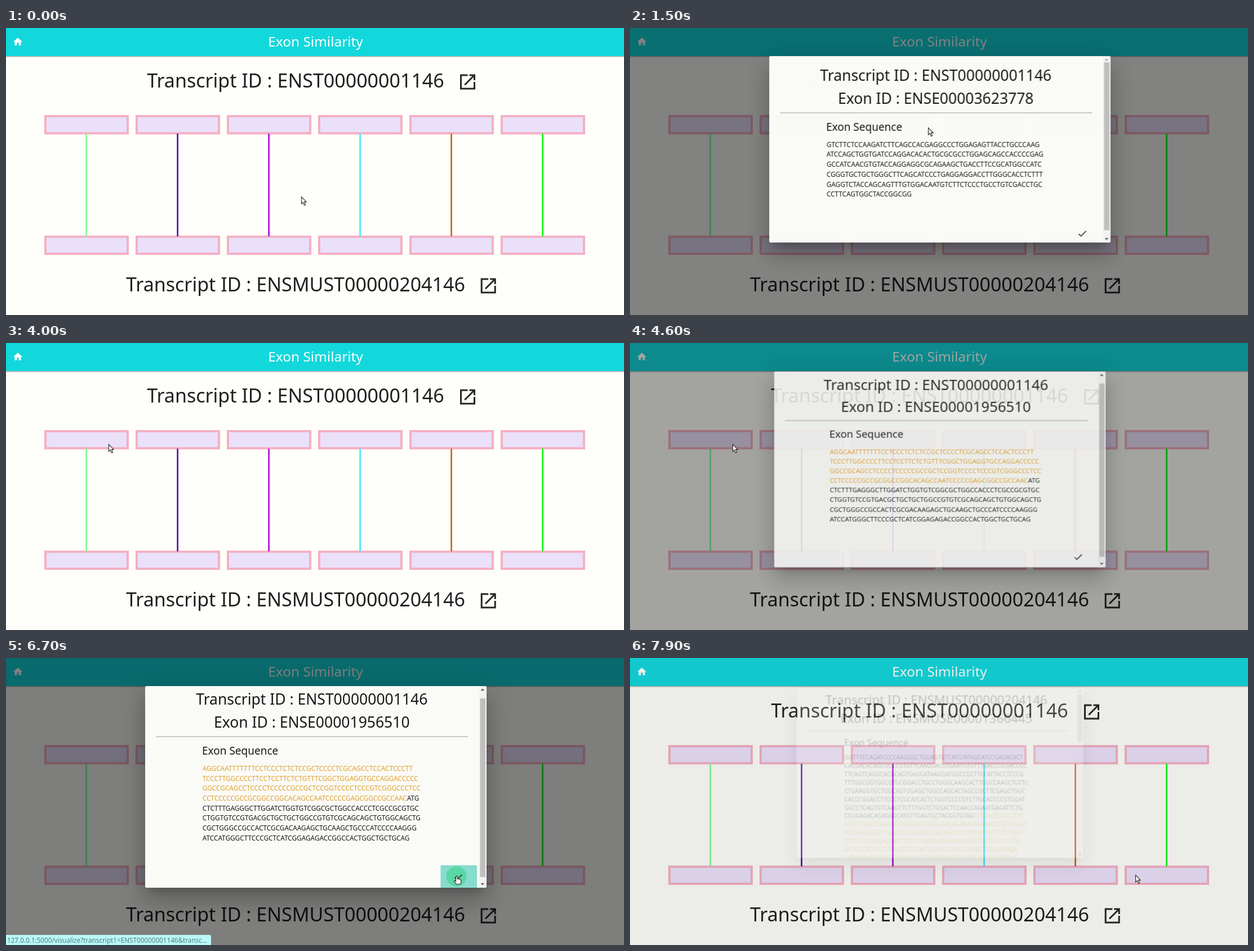
An HTML page for the animation above (8 s loop, 1097 by 511 pixels).

```html
<!DOCTYPE html>
<html lang="en">
<head>
<meta charset="utf-8">
<title>Exon Similarity</title>
<style>
html, body { margin: 0; width: 100%; height: 100%; overflow: hidden; background: #fefefa; }
body { position: relative; font-family: "Noto Sans", "Open Sans", sans-serif; }
svg { position: absolute; left: 0; top: 0; overflow: visible; }
text { fill: #1f1f1f; white-space: pre; }
.mid { text-anchor: middle; }
#bar { position: absolute; left: 0; top: 0; width: 1097px; height: 50px; background: #12d8dc;
  box-shadow: 0 1px 2px rgba(0,0,0,.45); }
#shade { position: absolute; inset: 0; background: #000; opacity: 0; }
.modal { position: absolute; left: 246.5px; top: 50px; width: 605.5px; overflow: hidden; opacity: 0;
  background: #fafaf6; border-radius: 2px;
  box-shadow: 0 24px 38px 3px rgba(0,0,0,.14), 0 9px 46px 8px rgba(0,0,0,.12), 0 11px 15px -7px rgba(0,0,0,.2); }
.modal text { fill: #181818; }
.modal .utr { fill: #e2a02c; }
#status { position: absolute; left: 0; top: 493px; width: 364px; height: 18px; opacity: 0;
  background: #b8f8f8; border-radius: 0 3px 0 0; font-size: 11.7px; line-height: 19px;
  color: #587a7e; white-space: nowrap; text-indent: 2px; }
</style>
</head>
<body>
<div id="bar"></div>
<svg id="page" width="1097" height="511"></svg>
<div id="shade"></div>
<div id="status">127.0.0.1:5000/visualize?transcript1=ENST00000001146&amp;transc…</div>
<svg id="pointer" width="20" height="20" stroke="#222" stroke-width="1.1">
  <path d="M.5 .5V13L3.4 10.4 5.4 15.6 7.6 14.7 5.5 9.6H9.2Z" fill="#fff"/>
  <path d="M-1.5 8V1.2Q-.2 -1 1.1 1.2V5L5.4 6 7.8 7.5V10.5L6.6 14.8H-.6L-4.6 9.8Q-4 7.5 -1.5 9.6Z" fill="#fff"/>
  <path d="M-3 -8H3M0 -8V8M-3 8H3" fill="none"/>
</svg>
<script>
const LOOP = 8000, STEP = 100, FADE = 250, SCROLL = 11;
const $ = id => document.getElementById(id);

const OPEN_ICON = 'M12 4H4V20H20V12M14 4H20V10M20 4L8.5 15.5';
const HOME_ICON = 'M10 20v-6h4v6h5v-8h3L12 3 2 12h3v8z';
const CHECK_ICON = 'M4 12.7L9 17.6 20.3 6.3';

const icon = (d, x, y, k, paint) => `<path d="${d}" transform="translate(${x} ${y}) scale(${k})" ${paint}/>`;
const stroke = 'fill="none" stroke="#262626" stroke-width="2"';
const label = (s, x, y, size, extra = '') => `<text x="${x}" y="${y}" font-size="${size}" ${extra}>${s}</text>`;
const centred = (s, x, y, size, extra = '') => label(s, x, y, size, 'class="mid" ' + extra);

// Page behind the dialogs
const HUMAN = 'Transcript ID : ENST00000001146', MOUSE = 'Transcript ID : ENSMUST00000204146';
const exon = (x, y) => `<rect x="${x + 2}" y="${y + 2}" width="146" height="30.4" fill="#eae0fa" stroke="#f4b0c4" stroke-width="4"/>`;
const links = ['#7dfa90', '#5208ac', '#ac04d8', '#40e8f8', '#d05a20', '#0cf80c'];
$('page').innerHTML =
  icon(HOME_ICON, 11.4, 14.8, .8, 'fill="#fff"') +
  centred('Exon Similarity', 549.5, 32.5, 24.4, 'style="fill:#fff"') +
  centred(HUMAN, 514, 106, 34) + icon(OPEN_ICON, 801.5, 78, 1.5, stroke) +
  centred(MOUSE, 514, 469, 34) + icon(OPEN_ICON, 838.2, 441, 1.5, stroke) +
  links.map((c, i) => {
    const x = 68 + 162 * i;
    return exon(x, 155) + exon(x, 369.6) +
      `<path d="M${x + 74.6} 188V371" stroke="${c}" stroke-width="2.6"/>`;
  }).join('');

// Dialogs; lower-case runs are the untranslated parts
const dialogs = [
  { title: HUMAN, exon: 'ENSE00003623778', h: 332, thumb: 299, open: 1282, close: 3150,
    hover: 2400, press: 3000, spot: 557.5, tint: '#62d9ca', seq: `
GTCTTCTCCAAGATCTTCAGCCACGAGGCCCTGGAGAGTTACCTGCCCAAG
ATCCAGCTGGTGATCCAGGACACACTGCGCGCCTGGAGCAGCCACCCCGAG
GCCATCAACGTGTACCAGGAGGCGCAGAAGCTGACCTTCCGCATGGCCATC
CGGGTGCTGCTGGGCTTCAGCATCCCTGAGGAGGACCTTGGGCACCTCTTT
GAGGTCTACCAGCAGTTTGTGGACAATGTCTTCTCCCTGCCTGTCGACCTGC
CCTTCAGTGGCTACCGGCGG` },
  { title: HUMAN, exon: 'ENSE00001956510', h: 359, thumb: 318, open: 4482, close: 6750,
    hover: 6400, press: 6600, spot: 552.5, tint: '#86dccd', seq: `
aggcaatttttttcctccctctctccgctcccctcgcagcctccactccctt
tcccttggccccttcctccttctctgtttcggctggaggtgccaggaccccc
ggccgcagcctcccctcccccgccgctccggtcccctcccgtcgggccctcc
cctcccccgccgcggccggcacagccaatcccccgagcggccgccaacATG
CTCTTTGAGGGCTTGGATCTGGTGTCGGCGCTGGCCACCCTCGCCGCGTGC
CTGGTGTCCGTGACGCTGCTGCTGGCCGTGTCGCAGCAGCTGTGGCAGCTG
CGCTGGGCCGCCACTCGCGACAAGAGCTGCAAGCTGCCCATCCCCAAGGG
ATCCATGGGCTTCCCGCTCATCGGAGAGACCGGCCACTGGCTGCTGCAG` },
  { title: MOUSE, exon: 'ENSMUSE00001366445', h: 359, thumb: 100, open: 7882, close: 9999, seq: `
GGTTTCCAGATCCCCAAGGGCTGGAGTGTCATGTATAGCATCCGAGACACT
CACGACACAGCGGCCGTGTTCAAGGACGTGAATGTGTTTGACCCGGACCGC
TTCAGTCAGGCACGCAGTGAGGATAAGGATGGCCGCTTCCATTACCTCCCG
TTTGGCGGTGGCGTGCGGACCTGCCTGGGCAAGCACTTGGCCAAGCTGTTC
CTGAAGGTGCTGGCAGTGGAGCTGGCCAGCACTAGCCGCTTCGAGCTGGC
CACCCGGACCTTCCCTCGCATCACTCTGGTCCCCGTCTTGCACCCCGTGGAT
GGCCTCAGTGTCAAGTTCTTTGGTCTGGACTCCAACCAGAATGAGATTCTG
CCGGAGACAGAGGCCATGTTGAGTGCTACGGTGTAGcctcactctggtctc
agcccagcccaacagcaggggtgggggacagagatagaaacctgtggggt
ggggaggggctgggtgggaggccagcagccccctatgttgttctctggcc
tcttccctggcagtacctcccccaaagacaaaagggcccgccccctcctg
actccctctctcttggatctccactgccacctagcttagcctgggacaga
ggtaccactctacccatcacagtcttacccagccccttcacgaggtccag` }
];

// One keyframe per step, each held until the next
function play(el, fn) {
  const frames = [];
  for (let t = 0; t < LOOP; t += STEP) frames.push({ ...fn(t), offset: t / LOOP, easing: 'step-end' });
  frames.push({ ...fn(LOOP - STEP), offset: 1 });
  el.animate(frames, { duration: LOOP, iterations: Infinity });
}

const clamp = u => Math.max(0, Math.min(1, u));
const easeOut = (u, n) => 1 - (1 - clamp(u)) ** n;
const shown = (d, t, nIn, nOut) => t < d.close
  ? easeOut((t - d.open) / FADE, nIn)
  : 1 - easeOut((t - d.close) / FADE, nOut);
const scrolled = t => t < 2700 ? 0 : t < 2800 ? 6 : SCROLL;

const seqLine = (s, i) => label(
  s.replace(/[a-z]+/g, m => `<tspan class="utr">${m.toUpperCase()}</tspan>`), 101.7, 161.8 + 17.7 * i, 11.8);

function buttonMarkup(d, i) {
  const y = d.h - 37 + (i ? 8 : 0);
  const box = `x="524.5" y="${y}" width="64.5" height="43"`;
  return `<clipPath id="clip${i}"><rect ${box}/></clipPath>
    <rect class="btn" ${box} rx="2" fill="${d.tint}" opacity="0"/>
    <circle class="wave" cx="${d.spot}" cy="${y + 20}" r="20" fill="#4fd69a" opacity="0" clip-path="url(#clip${i})"/>` +
    icon(CHECK_ICON, 546.3, y + 11.6, .8, stroke);
}

function buildDialog(d, i) {
  const el = document.createElement('div');
  el.className = 'modal';
  el.style.height = d.h + 'px';
  el.innerHTML = `<svg width="605.5" height="${d.h}"><g class="body">` +
    centred(d.title, 295.8, 44.4, 26.5) +
    centred('Exon ID : ' + d.exon, 295.8, 84.6, 26.5) +
    '<path d="M19.5 101H573" stroke="#b8b8b6" stroke-width="1.6"/>' +
    label('Exon Sequence', 101, 132.6, 19) +
    d.seq.trim().split('\n').map(seqLine).join('') + (d.spot ? buttonMarkup(d, i) : '') + `</g>
    <rect x="593" width="12.5" height="${d.h}" fill="#f3f3f1"/>
    <rect class="thumb" x="594.5" y="11" width="9.5" height="${d.thumb}" fill="#bfbfbd"/>
    <path class="up" d="M595.8 8h6.4l-3.2-3.6z" fill="#505050"/>
    <path class="down" d="M595.8 ${d.h - 8}h6.4l-3.2 3.6z" fill="#505050"/></svg>`;
  document.body.insertBefore(el, $('status'));

  const part = c => el.querySelector('.' + c);
  play(el, t => {
    const p = shown(d, t, 3, 3);
    return { opacity: p, transform: `translateY(${(p - 1) * 30.7}px) scale(${.8 + .2 * p})` };
  });
  const offset = t => i ? SCROLL : scrolled(t);
  play(part('body'), t => ({ transform: `translateY(${-offset(t)}px)` }));
  play(part('thumb'), t => ({ transform: `translateY(${i > 1 ? 2.5 : offset(t)}px)` }));
  if (!i) {
    play(part('up'), t => ({ fill: scrolled(t) ? '#505050' : '#a6a6a6' }));
    play(part('down'), t => ({ fill: scrolled(t) < SCROLL ? '#505050' : '#a6a6a6' }));
  }
  if (d.spot) {
    play(part('btn'), t => ({ opacity: t < d.hover ? 0 : t < d.press ? .8 : 1 }));
    play(part('wave'), t => ({
      opacity: t < d.press ? 0 : .8,
      r: `${Math.max(0, 7 + (t - d.press) * .11)}px`
    }));
  }
}
dialogs.forEach(buildDialog);

play($('shade'), t => ({ opacity: .5 * Math.max(...dialogs.map(d => shown(d, t, 2, 4))) }));

const within = (t, a, b) => t < a || t > b ? 0 : t === a || t === b ? .5 : 1;
play($('status'), t => ({ opacity: Math.max(within(t, 2400, 3700), within(t, 6500, 7100)) }));

// Pointer glides: first and last step in time, then where it arrives
const glides = [
  [600, 700, 555, 225], [800, 900, 531, 177], [1100, 1100, 529, 177], [2000, 2000, 734, 305],
  [2200, 2500, 804, 348], [3300, 3500, 451, 262], [3700, 4000, 182, 180], [4800, 5100, 611, 256],
  [5200, 5300, 649, 256], [5400, 5500, 708, 256], [5700, 5700, 697, 256], [5800, 5800, 709, 256],
  [6000, 6000, 719, 261], [6200, 6500, 800, 388], [6900, 7000, 1016, 400], [7100, 7300, 897, 386]
];
function pointerAt(t) {
  let x = 524, y = 300;
  for (const [from, to, gx, gy] of glides) {
    const u = clamp((t - from + STEP) / (to - from + STEP));
    x += (gx - x) * u;
    y += (gy - y) * u;
  }
  return `translate(${x}px, ${y}px)`;
}
const between = (t, a, b) => t >= a && t < b;
const shapeAt = t => between(t, 2400, 3300) || between(t, 6400, 6900) ? 1 : between(t, 5300, 6000) ? 2 : 0;

play($('pointer'), t => ({ transform: pointerAt(t) }));
[...$('pointer').children].forEach((shape, k) =>
  play(shape, t => ({ opacity: shapeAt(t) === k ? 1 : 0 })));
</script>
</body>
</html>
```
